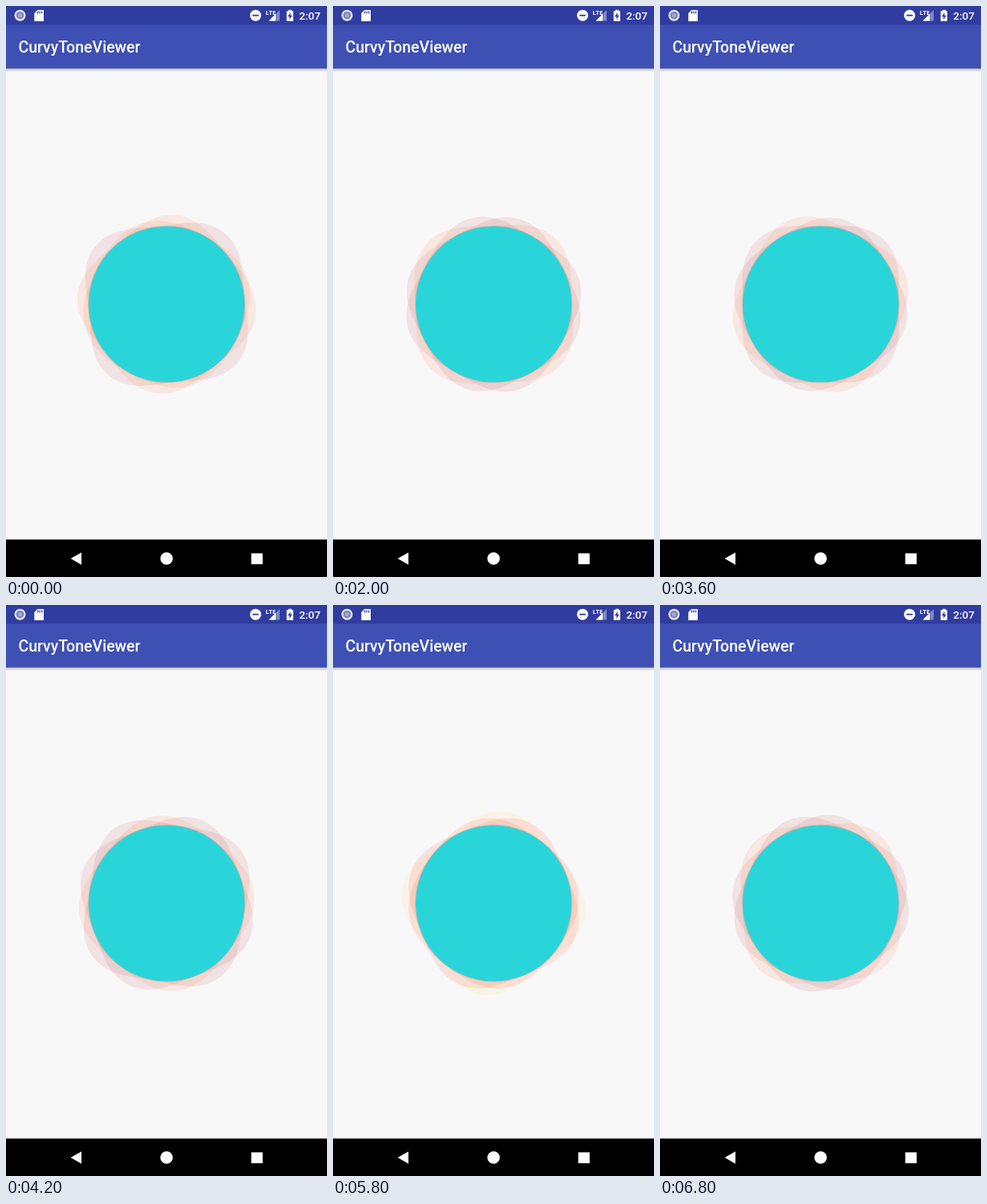
Recreate the animation shown at these times as an HTML page with a canvas. Size 400 by 711 pixels, loop 7 s.

```html
<!DOCTYPE html>
<html lang="en">
<head>
<meta charset="utf-8">
<title>Round tone display</title>
<style>
html, body { margin: 0; width: 100%; height: 100%; overflow: hidden; background: #f9f8f9; }
canvas { display: block; }
</style>
</head>
<body>
<canvas id="stage" width="400" height="711"></canvas>
<script>
const ctx = document.getElementById('stage').getContext('2d');
const LOOP = 7000, STEP = 200;
const CX = 200.2, CY = 371.4, RADIUS = 97.2;

const TONES = {
  pink: [180, 75, 70, 0.125],
  peach: [235, 122, 62, 0.125],
  coral: [236, 92, 74, 0.14],
  yellow: [250, 212, 115, 0.125]
};

// Angles in degrees, speeds in degrees per second.
// Each key is [time in ms, wave height, tone]; a negative height swaps peaks and valleys.
const LAYERS = [
  { angle: 39, speed: 17.8, keys: [[0, 8.6, 'pink'], [800, 8.2, 'pink'], [2000, 6.8, 'pink'], [2800, 4, 'pink'],
    [4200, 7.5, 'pink'], [5800, -9, 'yellow'], [6800, 6.8, 'pink']] },
  { angle: 73, speed: 17.2, keys: [[0, 4.2, 'peach'], [800, 7.2, 'pink'], [2000, 6.8, 'pink'], [2800, 7, 'pink'],
    [4200, 8.2, 'pink'], [5800, 4.6, 'coral'], [6800, 6.8, 'pink']] },
  { angle: 6, speed: 18.4, keys: [[0, 7.2, 'peach'], [800, 4.2, 'peach'], [2000, 7.7, 'peach'], [2800, 9, 'peach'],
    [4200, 6.2, 'peach'], [5800, 6.4, 'coral'], [6800, 7.7, 'peach']] }
];

const mix = (a, b, k) => a + (b - a) * k;

function sample(keys, t) {
  const next = keys.findIndex(key => key[0] > t);
  const b = keys[next < 0 ? keys.length - 1 : next];
  const a = next < 0 ? b : keys[next - 1];
  const k = a === b ? 0 : (t - a[0]) / (b[0] - a[0]);
  const tone = TONES[a[2]].map((v, i) => mix(v, TONES[b[2]][i], k));
  return { height: mix(a[1], b[1], k), color: `rgba(${tone.join(',')})` };
}

function rect(x, y, w, h, color) {
  ctx.fillStyle = color;
  ctx.fillRect(x, y, w, h);
}

function disc(x, y, r, color) {
  ctx.fillStyle = color;
  ctx.beginPath();
  ctx.arc(x, y, r, 0, Math.PI * 2);
  ctx.fill();
}

function polygon(points, color) {
  ctx.fillStyle = color;
  ctx.beginPath();
  points.forEach(([x, y]) => ctx.lineTo(x, y));
  ctx.closePath();
  ctx.fill();
}

function label(text, x, y, font, align = 'left') {
  ctx.font = font;
  ctx.textAlign = align;
  ctx.fillStyle = '#fff';
  ctx.fillText(text, x, y);
}

function wave({ angle, speed, keys }, t) {
  const { height, color } = sample(keys, t);
  const turn = (angle + speed * t / 1000) * Math.PI / 180;
  const points = Array.from({ length: 180 }, (_, i) => {
    const a = i * Math.PI / 90;
    const r = RADIUS + Math.abs(height) + height * Math.cos(4 * (a - turn));
    return [CX + r * Math.sin(a), CY - r * Math.cos(a)];
  });
  polygon(points, color);
}

function statusBar() {
  rect(0, 0, 400, 24, '#303c9f');
  disc(17.5, 11.7, 7, '#e4e6f4');
  disc(17.5, 11.7, 4.8, '#7c82b8');
  disc(17.5, 11.7, 2.6, '#a3a7cf');

  polygon([[39.2, 5], [47, 5], [47, 19], [35.3, 19], [35.3, 9]], '#fff');
  [39, 41.5, 44].forEach(x => rect(x, 6.5, 1.3, 3, '#303c9f'));

  disc(311, 11.7, 7, '#fff');
  rect(307.2, 10.8, 7.6, 1.8, '#303c9f');

  polygon([[341, 5], [341, 18.5], [327.5, 18.5]], '#8088c4');
  polygon([[336, 10], [336, 18.5], [327.5, 18.5]], '#fff');
  rect(323, 3, 11, 9, '#303c9f');
  label('LTE', 323.5, 11, 'bold 7.5px "Open Sans", sans-serif');

  rect(352, 4.8, 4, 2, '#fff');
  rect(349.7, 6.2, 8.2, 12.6, '#fff');
  polygon([[354.5, 8], [351, 13.2], [353.3, 13.2], [353.3, 17], [356.7, 11.7], [354.5, 11.7]], '#303c9f');
  label('2:07', 392, 17, '500 13.6px Roboto, sans-serif', 'right');
}

function toolbar() {
  const shadow = ctx.createLinearGradient(0, 77.8, 0, 82);
  shadow.addColorStop(0, 'rgba(0,0,0,0.26)');
  shadow.addColorStop(1, 'rgba(0,0,0,0)');
  rect(0, 77, 400, 5, shadow);
  rect(0, 23.3, 400, 54.5, '#3e50b4');
  label('CurvyToneViewer', 15.5, 58, '500 19.5px Roboto, sans-serif');
}

function navigation() {
  rect(0, 664.35, 400, 46.65, '#000');
  polygon([[80.6, 688], [94, 680.4], [94, 695.8]], '#fff');
  disc(200.1, 688, 7.8, '#fff');
  rect(305.6, 681.5, 14.2, 13.6, '#fff');
}

function draw(now) {
  const t = Math.floor((now % LOOP) / STEP) * STEP;
  rect(0, 0, 400, 711, '#f9f8f9');
  statusBar();
  toolbar();
  LAYERS.forEach(layer => wave(layer, t));
  disc(CX, CY, RADIUS + 1, 'rgba(243,150,132,0.4)');
  disc(CX, CY, RADIUS, '#2ad5da');
  navigation();
}

const start = performance.now();
function tick() {
  draw(performance.now() - start);
  requestAnimationFrame(tick);
}
tick();
</script>
</body>
</html>
```
